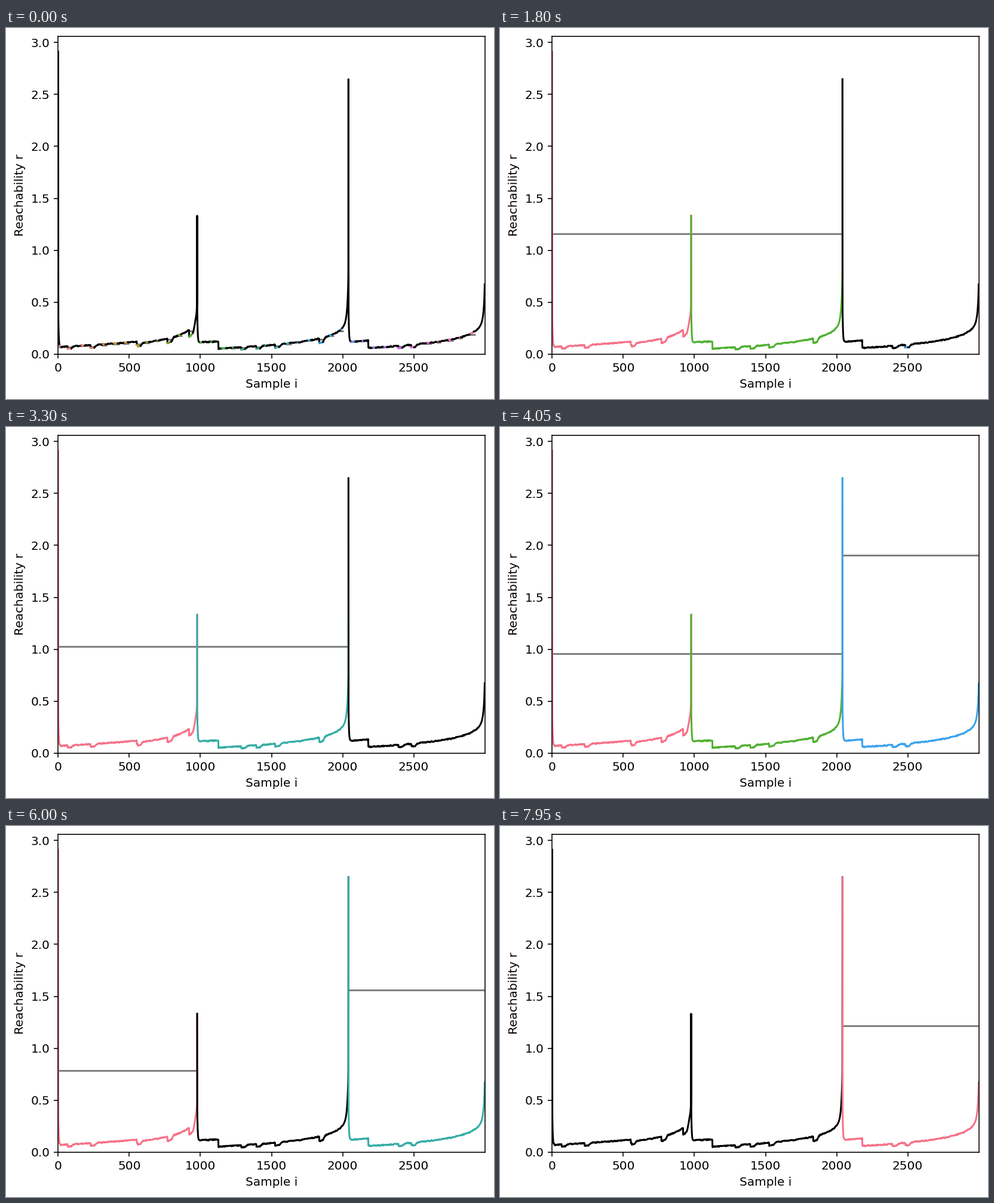
A matplotlib script that plays this animation: 817 px wide and 622 px high, repeating every 8000 ms.

```python
import numpy as np
import matplotlib.pyplot as plt
from matplotlib.animation import FuncAnimation
from matplotlib.collections import LineCollection
from matplotlib.colors import to_rgb

W, H, DPI = 817, 622, 144
TICK, STEP, LOOP = 50, 150, 8000
N, PEAK_A, PEAK_B = 3000, 977, 2041
TOP = 2.912
BLACK = (0, 0, 0)

# A few sharp notches in the otherwise smooth valleys.
DOT_START = 2484
NOTCHES = [67, 228, 553, 768, 921, 1288, 1394, 1526, 1836, 2393, DOT_START]

LEFT, MIDDLE, RIGHT = (0, PEAK_A), (PEAK_A, PEAK_B), (PEAK_B, N - 1)
DOT = (DOT_START, DOT_START + 20)
# Large clusters, each list valid from its step on.
STAGES = [(9, [LEFT, MIDDLE, DOT]), (20, [LEFT, MIDDLE]),
          (25, [LEFT, MIDDLE, RIGHT]), (35, [LEFT, RIGHT]), (46, [RIGHT])]

rng = np.random.default_rng(4)

# Evenly bright hues, equally spaced around the wheel.
WHEEL = np.array([to_rgb(c) for c in (
    "#f77189", "#bb9832", "#50b131", "#36ada4", "#3ba3ec", "#e866f4", "#f77189")])


def hue(fraction):
    stops = np.linspace(0, 1, len(WHEEL))
    return tuple(np.interp(fraction, stops, channel) for channel in WHEEL.T)


def valley(length, peak, shoulder, shoulder_end, tail):
    """A spike, a quick fall to the floor, then a logarithmic climb."""
    i = np.arange(length)
    left = length - i
    r = .495 - .065 * np.log(left) + tail * np.exp(-left / 8)
    r += .4 * np.exp(-i / 3) + shoulder * (i < shoulder_end)
    r[0] = peak
    return r


def reachability():
    r = np.concatenate([
        valley(PEAK_A, TOP, .02, 560, 0),
        valley(PEAK_B - PEAK_A, 1.332, .07, 150, .3),
        valley(N - PEAK_B, 2.647, .07, 140, .2)])
    for start in NOTCHES:
        k = np.arange(45)
        r[start:start + 45] *= 1 - .28 * np.clip((45 - k) / 20, 0, 1)
    jitter = np.repeat(rng.uniform(-.005, .005, N // 6), 6)
    return np.where(r < .25, r + jitter, r)


def small_clusters():
    between = [x for x in range(12, N - 40, 76)
               if min(abs(x - s) for s in NOTCHES) > 45]
    spans = [(s, s + 26) for s in NOTCHES if s != DOT_START] + [DOT]
    spans += [(x, x + int(rng.integers(8, 34))) for x in between]
    return sorted(spans)


reach = reachability()
points = np.column_stack([np.arange(N), reach])
SMALL = small_clusters()
lifetimes = rng.integers(1, 8, len(SMALL))


def clusters_at(step):
    found = [c for c, life in zip(SMALL, lifetimes) if step < life or c == DOT]
    for first, spans in STAGES:
        if step >= first:
            found = spans
    return found


def threshold(start, end, xi):
    pad = 10 if end - start < 100 else 0
    a, b = start - pad, end + pad
    right = np.inf if b == N - 1 else reach[b]
    level = min(reach[a], right) * (1 - xi)
    return [(a, level), (b, level)]


def pieces(clusters):
    """Split the curve into black and coloured runs, left to right."""
    runs, colors, pos = [], [], 0
    for k, (start, end) in enumerate(clusters):
        if start > pos:
            runs.append(points[pos:start + 1])
            colors.append(BLACK)
        runs.append(points[start:end + 1])
        colors.append(hue(k / len(clusters)))
        pos = end
    if pos < N - 1:
        runs.append(points[pos:])
        colors.append(BLACK)
    return runs, colors


plt.rcParams["font.family"] = "DejaVu Sans"
fig = plt.figure(figsize=(W / DPI, H / DPI), dpi=DPI, facecolor="white")
# Default axes proportions of a 6.4 x 4.8 inch figure, cropped to its content.
axes_w, axes_h = .775 * 6.4 * DPI, .77 * 4.8 * DPI
ax = fig.add_axes([87.4 / W, 1 - (14.4 + axes_h) / H, axes_w / W, axes_h / H])
ax.set(xlim=(0, N), ylim=(0, TOP * 1.05), xlabel="Sample i", ylabel="Reachability r")
ax.set_xticks(range(0, N, 500))
ax.set_yticks(np.arange(0, 3.1, .5))

levels = ax.add_collection(
    LineCollection([], colors="gray", linewidths=1.5, zorder=2), autolim=False)
curve = ax.add_collection(
    LineCollection([], linewidths=1.5, capstyle="projecting", joinstyle="round",
                   zorder=2.1), autolim=False)


def update(frame):
    step = frame * TICK // STEP
    xi = (step + 1) / 100
    clusters = clusters_at(step)
    levels.set_segments([threshold(s, e, xi) for s, e in clusters])
    runs, colors = pieces(clusters)
    curve.set_segments(runs)
    curve.set_color(colors)
    return levels, curve


anim = FuncAnimation(fig, update, frames=LOOP // TICK, interval=TICK,
                     repeat=True, repeat_delay=0, blit=False)
plt.show()
```
